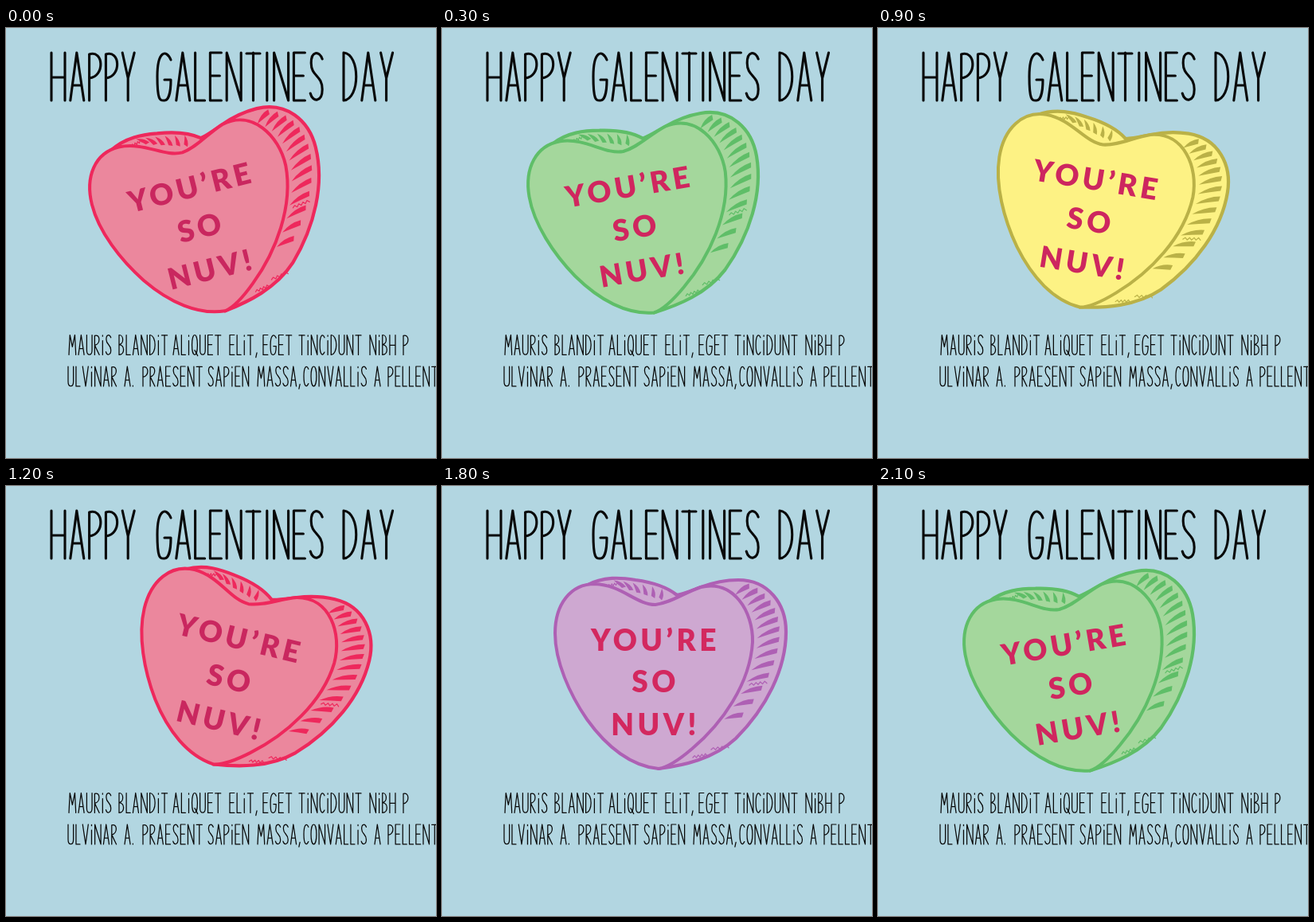
Recreate the animation shown at these times as an HTML page with a canvas. Size 540 px wide and 540 px high, loop 2400 ms.

```html
<!DOCTYPE html>
<html lang="en">
<head>
<meta charset="utf-8">
<title>Happy Galentines Day</title>
<style>
  html, body { margin: 0; width: 100%; height: 100%; overflow: hidden; background: #b2d6e1; }
  canvas { display: block; }
</style>
</head>
<body>
<canvas id="stage" width="540" height="540">
  HAPPY GALENTINES DAY. YOU'RE SO NUV!
  Mauris blandit aliquet elit, eget tincidunt nibh p
  ulvinar a. Praesent sapien massa, convallis a pellent
</canvas>
<script>
const ctx = document.getElementById('stage').getContext('2d');
const STEP = 300;

// Hand lettering: [width, pen path] in a box 60 units high
const PEN = {
  A: [17, 'M0 60L8 0L17 60M3 41H14'],
  B: [14, 'M0 0V60C18 60 18 30 0 29C15 28 15 0 0 0'],
  C: [14, 'M14 8C8 -6 0 0 0 30S8 66 14 52'],
  D: [16, 'M0 0V60C21 58 21 2 0 0'],
  E: [14, 'M14 0H0V60H14M0 29H12'],
  G: [17, 'M17 9C11 -5 0 -2 0 30S4 60 9 60S17 50 17 34H9'],
  H: [17, 'M0 0V60M17 0V60M0 31H17'],
  I: [4, 'M2 0V60'],
  i: [4, 'M2 17V60M2 1V4'],
  L: [12, 'M0 0V60H12'],
  M: [21, 'M0 60L3 0L10.5 36L18 0L21 60'],
  N: [18, 'M0 60V0L18 60V0'],
  O: [16, 'M8 0C-3 0 -3 60 8 60S19 0 8 0'],
  P: [14, 'M0 60V2C18 -4 20 30 0 32'],
  Q: [16, 'M8 0C-3 0 -3 60 8 60S19 0 8 0M8 46L17 63'],
  R: [14, 'M0 60V2C18 -4 18 28 0 31L14 60'],
  S: [15, 'M15 8C11 -3 1 -2 1 13C1 30 15 28 15 46C15 62 3 63 0 51'],
  T: [17, 'M0 1H17M8.5 0V60'],
  U: [16, 'M0 0V45C0 64 16 64 16 45V0'],
  V: [17, 'M0 0L9 60L17 0'],
  Y: [15, 'M0 0L7 32L15 0M7 32V60'],
  ',': [3, 'M3 54L0 68'],
  '.': [0, 'M0 58V60']
};
for (const k in PEN) PEN[k][1] = new Path2D(PEN[k][1]);

function letter(text, starts, y, scale, gap, pen) {
  ctx.strokeStyle = '#080808';
  ctx.lineWidth = pen;
  text.split(' ').forEach((word, i) => {
    ctx.save();
    ctx.translate(starts[i], y);
    ctx.scale(scale, scale);
    for (const ch of word) {
      const [width, path] = PEN[ch];
      ctx.stroke(path);
      ctx.translate(width + gap, 0);
    }
    ctx.restore();
  });
}

const face = new Path2D('M268 149C287 147 304 134 325 127C366 117 391 158 390 196C387 248 352 298 314 330C300 342 285 353 272 355C238 352 207 328 182 293C160 261 142 220 142 185C142 149 161 123 192 123C225 124 244 149 268 149Z');
const back = new Path2D('M181 125C203 113 225 115 243 118C265 121 284 128 295 137C305 135 314 131 325 127C341 121 356 118 372 118C410 118 432 148 432 183C432 230 407 279 369 317C341 343 303 351 272 355L200 250Z');

const candy = (fill, line, ink) => ({ fill, line, ink });
const pink = candy('#eb879d', '#ee285c', '#c9275f');
const green = candy('#a4d79c', '#5fbe68', '#d0265f');
const purple = candy('#cea8d1', '#ae60b4', '#d3285f');
const yellow = candy('#fdf284', '#bab147', '#cd265f');

const pose = (look, deg, x, y) => ({ look, deg, x, y });
const poses = [
  pose(pink, -14, 243, 251),
  pose(green, -9.7, 242, 251),
  pose(purple, 0, 266, 246),
  pose(yellow, 9.2, 265, 242),
  pose(pink, 13.5, 280, 242)
];
const order = [0, 1, 2, 3, 4, 3, 2, 1];

const bez = (t, a, b, c, d) => {
  const u = 1 - t;
  return u * u * u * a + 3 * u * u * t * b + 3 * u * t * t * c + t * t * t * d;
};

// Tapered brush mark, thick at its far end
function mark(x, y, deg, len, thick) {
  ctx.save();
  ctx.translate(x, y);
  ctx.rotate(deg * Math.PI / 180);
  ctx.beginPath();
  ctx.moveTo(-len / 2, 1);
  ctx.quadraticCurveTo(0, -thick, len / 2, -thick / 2);
  ctx.lineTo(len / 2 - 3, thick / 2);
  ctx.quadraticCurveTo(0, thick / 3, -len / 2, 1);
  ctx.fill();
  ctx.restore();
}

function scribble(x, y, len) {
  ctx.beginPath();
  ctx.moveTo(x, y);
  for (let i = 1; i <= 8; i++) ctx.lineTo(x + len * i / 8, y - i * 0.4 + (i % 2 ? -2 : 1));
  ctx.lineWidth = 1.2;
  ctx.stroke();
}

function hatch() {
  for (let i = 0; i < 14; i++) {
    const t = 0.08 + i * 0.058;
    const x = bez(t, 362, 432, 432, 320);
    const y = bez(t, 125, 141, 240, 338);
    mark(x, y, -32 + 26 * t, 19 + 13 * Math.sin(Math.PI * t), 5.6);
  }
  for (let i = 0; i < 6; i++) mark(223 + i * 10.5, 123 + i * 2.6, 38 + i * 13, 17 - i * 0.5, 4.4);
  scribble(386, 250, 22);
  scribble(338, 331, 22);
  scribble(315, 341, 18);
  scribble(208, 126, 14);
}

function heart({ look, deg, x, y }) {
  ctx.save();
  ctx.translate(x, y);
  ctx.rotate(deg * Math.PI / 180);
  ctx.translate(-266, -246);
  ctx.fillStyle = look.fill;
  ctx.strokeStyle = look.line;
  ctx.lineWidth = 4.2;
  ctx.fill(back);
  ctx.stroke(back);
  ctx.fillStyle = look.line;
  hatch();
  ctx.fillStyle = look.fill;
  ctx.lineWidth = 4;
  ctx.fill(face);
  ctx.stroke(face);
  ctx.fillStyle = look.ink;
  ctx.font = '900 37px Lato, sans-serif';
  ctx.letterSpacing = '4.5px';
  ctx.textAlign = 'center';
  ctx.fillText('YOU’RE', 268, 207);
  ctx.fillText('SO', 268, 259);
  ctx.fillText('NUV!', 268, 313);
  ctx.restore();
}

function draw(now) {
  ctx.fillStyle = '#b2d6e1';
  ctx.fillRect(0, 0, 540, 540);
  ctx.lineCap = ctx.lineJoin = 'round';
  heart(poses[order[Math.floor(now / STEP) % order.length]]);
  letter('HAPPY GALENTINES DAY', [57, 190, 424], 31, 1, 6.8, 3.1);
  letter('MAURiS BLANDiT ALiQUET ELiT, EGET TiNCiDUNT NiBH P',
    [79, 142, 210, 281, 323, 368, 457, 499], 385.5, 0.415, 8, 3);
  letter('ULViNAR A. PRAESENT SAPiEN MASSA, CONVALLiS A PELLENT',
    [78, 149, 172, 254, 316, 374, 463, 480], 425, 0.415, 8, 3);
}

const start = performance.now();
function loop() {
  draw(performance.now() - start);
  requestAnimationFrame(loop);
}
loop();
</script>
</body>
</html>
```
